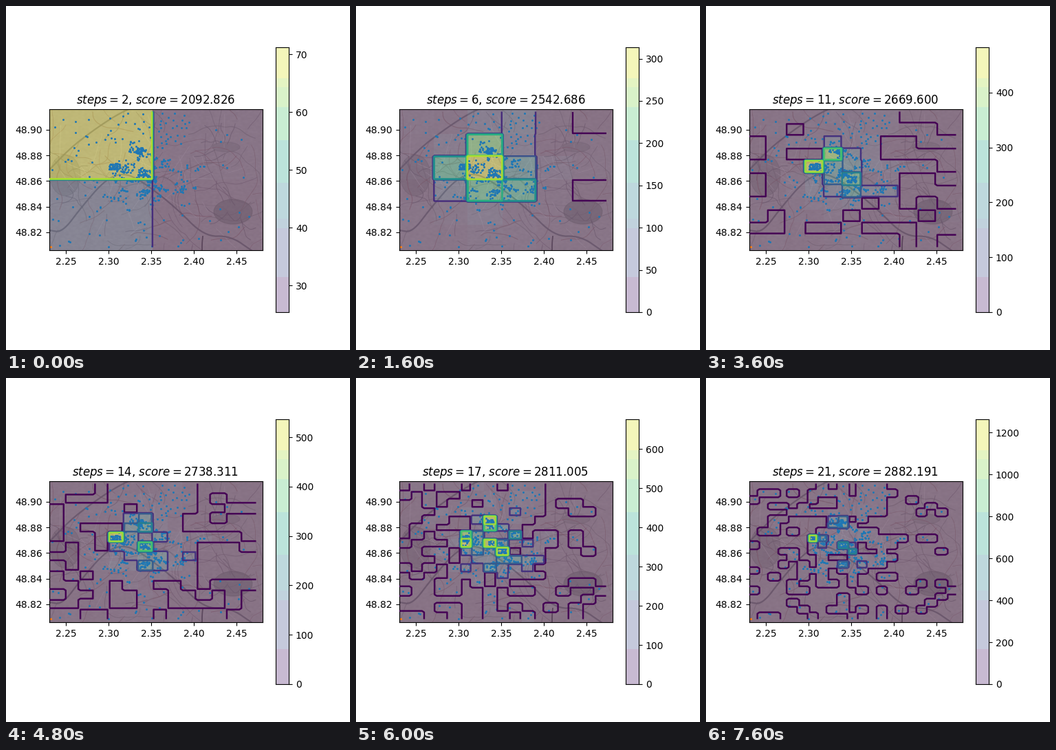
Animation of 500 by 500 pixels, one loop 8000 ms. Source, as a matplotlib script:

```python
import numpy as np
import matplotlib.pyplot as plt
from matplotlib.animation import FuncAnimation
from matplotlib.patches import Ellipse, Rectangle

GRID = 100
X0, X1, Y0, Y1 = 62.5, 363.5, 153.5, 350.5   # histogram area in stage pixels
CENTRE = np.array([213, 252])
rng = np.random.default_rng(12)
viridis = plt.get_cmap("viridis")

# steps: (score, highest density)
KEYS = {2: (2092.826, 71.25), 4: (2472.062, 242.5), 8: (2613.309, 384.5),
        11: (2669.600, 482.7), 16: (2784.119, 572), 19: (2864.777, 883),
        21: (2882.191, 1264)}


def lon(x):
    return 2.23 + (np.asarray(x) - 62.5) / 1240


def lat(y):
    return 48.916 - (np.asarray(y) - 150.2) / 1860


# ---------- points of interest ----------
def block(x0, x1, y0, y1, count):
    return rng.uniform((x0, y0), (x1, y1), (count, 2))


def hotspot(x, y, count):
    return block(x - 6.5, x + 6.5, y - 4.5, y + 4.5, count)


def quarter(corner, count, clump=3):
    """Small clumps between the centre and a corner, denser near the centre."""
    reach = rng.beta(1.1, 1.7, (count // clump, 2))
    hubs = CENTRE + reach * (np.array(corner) - CENTRE)
    return np.repeat(hubs, clump, axis=0) + rng.normal(0, 2.2, (len(hubs) * clump, 2))


points = np.vstack([
    hotspot(156, 233, 46), hotspot(170, 234, 14),
    hotspot(197, 210.5, 36), hotspot(184, 208, 12),
    hotspot(198, 242, 28), hotspot(212, 252, 26), hotspot(202, 271, 18),
    quarter((140, 204), 78), quarter((287, 204), 45),
    quarter((140, 300), 54), quarter((287, 300), 57),
    block(140, 213, 155, 202, 27), block(213, 272, 155, 202, 28),
    block(66, 138, 156, 350, 36), block(140, 300, 303, 350, 18),
    block(290, 362, 155, 349, 13),
])


def keyed(steps, part):
    return np.interp(steps, list(KEYS), [pair[part] for pair in KEYS.values()])


def density(steps):
    """Histogram density with steps x steps cells, sampled on the fine grid."""
    counts = np.histogram2d(points[:, 1], points[:, 0], bins=steps,
                            range=[[Y0, Y1], [X0, X1]])[0]
    low, high = 25.4 * (2 / steps) ** 3.75, keyed(steps, 1)
    if counts.min() == 0:
        low = 0
    counts = low + (counts - counts.min()) / np.ptp(counts) * (high - low)
    cell = np.minimum(np.linspace(0, steps, GRID).astype(int), steps - 1)
    return counts[np.ix_(cell, cell)], low, high


# ---------- stage ----------
fig = plt.figure(figsize=(5, 5), dpi=100, facecolor="white")
ax = fig.add_axes([0.125, 0.2904, 0.62, 0.4092])
cax = fig.add_axes([0.78375, 0.11, 0.0385, 0.77])
ax.set(xlim=(2.23, 2.48), ylim=(48.806, 48.916), facecolor="#a8a79d")
ax.set_autoscale_on(False)
xticks = np.arange(2.25, 2.46, 0.05)
yticks = np.arange(48.82, 48.905, 0.02)
ax.set_xticks(xticks, [f"{t:.2f}" for t in xticks])
ax.set_yticks(yticks, [f"{t:.2f}" for t in yticks])


# ---------- muted city map ----------
def smooth(path, rounds=3):
    path = np.asarray(path, float)
    for _ in range(rounds):
        a, b = path[:-1], path[1:]
        mid = np.stack([0.75 * a + 0.25 * b, 0.25 * a + 0.75 * b], 1).reshape(-1, 2)
        path = np.vstack([path[:1], mid, path[-1:]])
    return path


def line(path, color, width, alpha=1.0):
    p = smooth(path)
    ax.plot(lon(p[:, 0]), lat(p[:, 1]), color=color, lw=width, alpha=alpha, zorder=0.5)


def wander(start, length, turn):
    heading = rng.uniform(0, 2 * np.pi) + np.cumsum(rng.normal(0, turn, length))
    move = np.column_stack([np.cos(heading), np.sin(heading)]) * 8
    return start + np.cumsum(move, axis=0)


def park(x, y, width, height, alpha):
    ax.add_patch(Ellipse((lon(x), lat(y)), width / 1240, height / 1860, color="#767a6e",
                         alpha=alpha, lw=0.8, zorder=0.3))
    for _ in range(6):
        line(wander((x, y) + rng.normal(0, 0.2, 2) * (width, height), 5, 0.6),
             "#75756f", 0.7, 0.6)


speckle = rng.normal(0, 1, (102, 155))
speckle = (speckle + np.roll(speckle, 1, 1)) / 2
ax.imshow(speckle, cmap="gray", alpha=0.07, extent=(2.23, 2.48, 48.806, 48.916),
          aspect="auto", zorder=0.1, interpolation="bilinear")

park(86, 246, 44, 60, 0.3)
park(330, 299, 56, 36, 0.45)
park(320, 205, 40, 14, 0.25)

for _ in range(80):
    line(wander(rng.uniform((63, 150), (373, 355)), rng.integers(5, 16), 0.28),
         rng.choice(["#827d79", "#8d7b70", "#917a72", "#86867c"]),
         rng.uniform(0.4, 0.9), 0.65)
for _ in range(45):
    line(wander(rng.normal((215, 252), (70, 42)), rng.integers(3, 9), 0.1),
         "#bdbcb3", 0.6, 0.55)

line([(63, 238), (95, 205), (128, 180), (158, 160), (182, 148)], "#767772", 1.6, 0.85)
line([(63, 326), (82, 329), (110, 292), (142, 255), (165, 243), (190, 249),
      (245, 291), (288, 335), (326, 334), (358, 356)], "#767772", 1.6, 0.85)
line([(286, 335), (285, 345), (285, 356)], "#66645f", 1.3)

# ---------- dots and tint ----------
ax.scatter(lon(points[:, 0]), lat(points[:, 1]), s=4.6, color="#1f77b4", lw=0, zorder=2)
ax.scatter(lon([65]), lat([350]), s=4.6, color="#ff7f0e", lw=0, zorder=2)

PAD = 5
dx, dy = (X1 - X0) / (GRID - 1), (Y1 - Y0) / (GRID - 1)
reach = PAD + 0.5
tint = ax.imshow(np.zeros((GRID + 2 * PAD,) * 2), cmap=viridis, alpha=0.3, aspect="auto",
                 origin="upper", interpolation="nearest", zorder=1,
                 extent=(lon(X0 - reach * dx), lon(X1 + reach * dx),
                         lat(Y1 + reach * dy), lat(Y0 - reach * dy)))
ax.set(xlim=(2.23, 2.48), ylim=(48.806, 48.916))
grid_x, grid_y = lon(np.linspace(X0, X1, GRID)), lat(np.linspace(Y0, Y1, GRID))

# ---------- colour scale in flat bands ----------
edges = [0, 0.132, 0.317, 0.353, 0.488, 0.65, 0.774, 0.849, 0.883, 1]
for low, high in zip(edges[:-1], edges[1:]):
    shade = 0.7 + 0.3 * np.array(viridis((low + high) / 2)[:3])
    cax.add_patch(Rectangle((0, low), 1, high - low, color=shade, lw=0,
                            transform=cax.transAxes))
cax.set_xticks([])
cax.yaxis.tick_right()
cax.set_autoscale_on(False)

title = ax.set_title("")
outline = None


def draw(frame):
    global outline
    steps = frame + 2
    values, low, high = density(steps)
    tint.set_data(np.pad(values, PAD, mode="edge"))
    tint.set_clim(low, high)
    if outline is not None:
        outline.remove()
    outline = ax.contour(grid_x, grid_y, values, cmap=viridis, linewidths=1.75, zorder=3)
    cax.set_ylim(low, high)
    title.set_text(f"$steps={steps}$, $score={keyed(steps, 0):.3f}$")
    return []


anim = FuncAnimation(fig, draw, frames=20, interval=400, init_func=lambda: [],
                     repeat=True, repeat_delay=0, blit=False)
plt.show()
```
